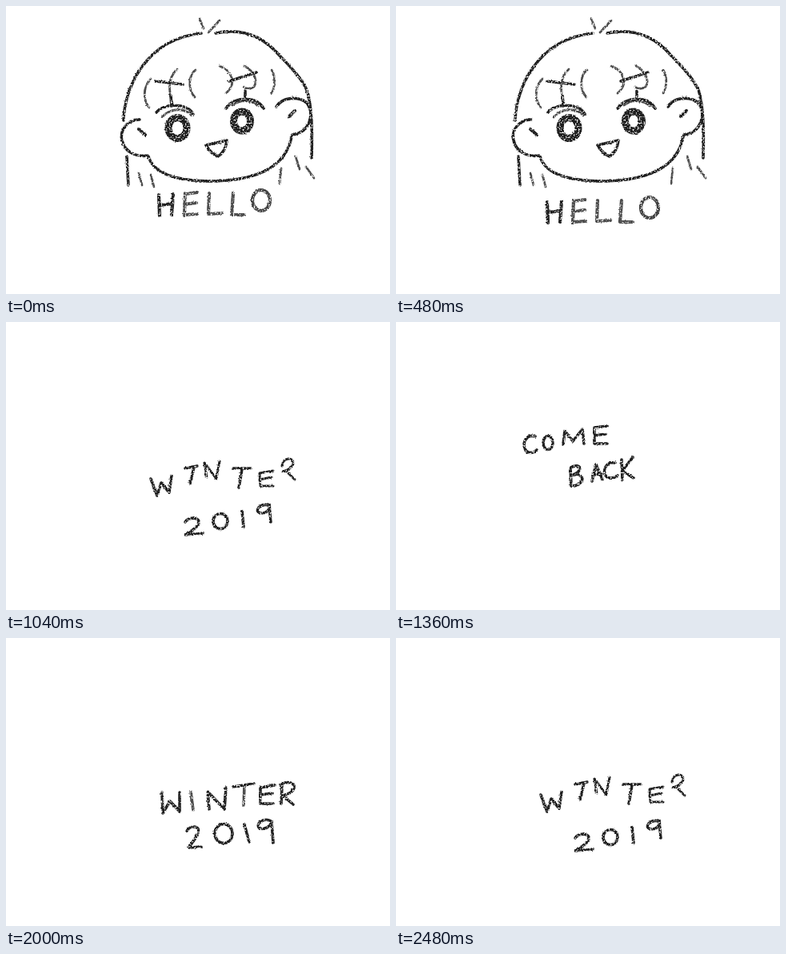
An HTML page that plays this animation: 480x360 px, repeating every 2.72 s.

```html
<!DOCTYPE html>
<html lang="en">
<head>
<meta charset="utf-8">
<title>Hello, winter 2019</title>
<style>
html, body { margin: 0; width: 100%; height: 100%; overflow: hidden; background: #fff; }
svg { display: block; width: 100vw; height: 100vh; }
#stage { fill: none; stroke: #1c1c1c; stroke-width: 3.6; stroke-linecap: round; stroke-linejoin: round; }
#stage > g { display: none; }
.thin { stroke-width: 2.8; opacity: .8; }
.bold { stroke-width: 4.2; }
</style>
</head>
<body>
<svg viewBox="0 0 480 360" role="img" aria-label="Hello. Poof. Winter 2019. Poof. Come back, winter 2019.">
<defs>
<!-- charcoal: rough edges and paper grain -->
<filter id="chalk" filterUnits="userSpaceOnUse" x="0" y="0" width="480" height="360" color-interpolation-filters="sRGB">
  <feTurbulence type="fractalNoise" baseFrequency=".5" numOctaves="2" seed="4" result="noise"/>
  <feDisplacementMap in="SourceGraphic" in2="noise" scale="2.5" xChannelSelector="R" yChannelSelector="G" result="rough"/>
  <feColorMatrix in="noise" values="0 0 0 0 0  0 0 0 0 0  0 0 0 0 0  4 0 0 0 -1.05" result="grain"/>
  <feComposite in="rough" in2="grain" operator="in"/>
</filter>

<g id="face1">
  <path d="M147 143C148 104 173 42 244 34M262 34C300 26 325 42 342 62C360 80 376 98 378 112C382 130 383 160 382 190
    M167 142C151 142 142 156 145 168C148 182 162 189 177 187M178 188C185 212 220 219 258 219C310 218 350 203 357 163
    M338 126C345 114 365 112 376 121C386 135 380 158 358 161M250 174L276 168C275 178 270 185 265 188C260 186 254 181 250 174
    M188 133C196 122 225 120 234 135M275 128C285 113 312 112 322 128M187 94L221 98M279 94L313 83
    M151 188L153 224M206 112L207 125M299 106V113"/>
  <path class="bold" d="M166 154L174 161M354 138L361 131"/>
  <path class="thin" d="M242 16L247 28M253 33L267 18M166 209L170 224M181 211L185 226M344 203L342 222M362 188L367 204M375 201L385 215
    M181 91C170 103 172 118 179 127M214 79C202 90 203 105 208 122M237 80C228 86 227 104 236 114
    M267 75C281 80 290 96 275 109M298 75C308 80 316 92 310 101C306 104 300 104 297 101M332 80C337 88 337 100 332 109
    M195 139C205 127 225 127 232 137M283 124C292 117 307 117 315 125"/>
  <ellipse cx="214.500" cy="152.500" rx="11.500" ry="13" stroke-width="9"/>
  <ellipse cx="295" cy="144" rx="10.500" ry="12" stroke-width="9"/>
</g>

<g id="face2">
  <path d="M150 140C150 106 165 85 180 70C205 42 225 30 248 29M262 34C290 27 318 30 333 45C355 65 368 90 373 114
    M174 140C160 135 145 145 145 160C146 178 158 189 175 183M175 184C188 212 215 216 258 216C310 214 352 200 356 164
    M336 130C343 114 362 109 375 115C390 130 386 158 357 163M274 167C260 169 252 174 251 180C257 187 264 191 268 191C271 187 274 180 274 175
    M191 139C195 118 225 117 235 130M277 128C280 112 310 110 320 124M213 117V124M298 107L299 113
    M150 182L153 225M379 158C385 180 387 195 387 211M351 139L362 132"/>
  <path class="thin" d="M163 155L172 158M170 209L172 224M180 210L182 222M346 203L344 222M363 189L367 212
    M173 93C172 110 173 120 180 129M186 94L214 97M211 78C207 88 211 98 200 112M241 75C231 85 231 103 238 113
    M274 76C290 84 287 98 276 108M282 92L304 84M308 78C317 85 316 98 306 105M330 82C338 92 338 102 328 113"/>
  <ellipse cx="215" cy="152.500" rx="11.500" ry="12.500" stroke-width="6.500"/>
  <ellipse cx="295.500" cy="143" rx="11" ry="12" stroke-width="8.500"/>
</g>

<g id="hello1" class="bold">
  <path d="M191 236L192 262M209 235L207 261M192 249L208 247"/>
  <path opacity=".8" d="M224 234L223 262M224 235L239 233M223 248L238 246M223 261L239 260M254 234L253 260L270 259M284 234L282 261L298 261"/>
  <ellipse opacity=".85" cx="319" cy="243" rx="11" ry="13"/>
</g>
<g id="hello2">
  <path d="M184 237V262M200 236V258M184 250L200 247M229 233L217 238V256L228 258M217 247L228 243M244 234L241 255L255 256M262 234L271 251L284 245"/>
  <ellipse cx="307.500" cy="243" rx="11" ry="12"/>
</g>

<path id="rays" stroke-width="3" opacity=".85" d="M193 83L201 91M313 72L308 83M348 84L340 95M158 139L171 133M182 199L175 214
  M275 215V228M322 212L330 221M350 201L361 205M367 167L379 161"/>
<g id="poof">
  <path d="M212 140L216 162M212 142C223 136 225 152 214 153M276 134L278 153M275 134L287 131M277 144L287 141"/>
  <ellipse cx="237.500" cy="146" rx="5.500" ry="7"/>
  <ellipse cx="260" cy="144" rx="6" ry="7.500"/>
</g>

<g id="winter1">
  <path d="M195 193L196 219L205 204L217 217V193M254 214L252 192L273 214L275 187M284 186L310 182M336 184L318 187V207L334 207
    M318 196L333 194M345 184L344 207M343 184C350 178 362 180 360 188C358 194 350 196 346 197L359 208"/>
  <path opacity=".8" d="M231 192L234 215M298 185L297 209"/>
</g>
<g id="year1">
  <path d="M226 241C230 234 243 234 240 243C238 251 230 258 229 262L244 261M298 233L304 255M332 229C322 224 311 232 317 238C323 240 331 236 332 229L334 256"/>
  <ellipse cx="272" cy="244.500" rx="11" ry="12"/>
</g>
<g id="winter2">
  <path d="M181 196L189 217L194 201L204 213L207 192M224 183L239 180M235 182L230 202M284 183L306 183M295 184L291 207"/>
  <path stroke-width="3" d="M251 194L248 176L263 196L267 174M334 186L317 189L318 205L334 205M317 197L332 194
    M345 180C346 169 360 168 359 177C357 184 350 186 346 187M350 186L361 197"/>
  <path d="M224 250C228 244 241 243 241 250C241 257 230 262 224 266L246 264M295 236L297 256M329 229C318 226 309 236 318 239C326 240 331 233 329 229L331 250"/>
  <ellipse cx="268" cy="249" rx="9" ry="9.500"/>
</g>

<g id="come">
  <path d="M174 143C163 140 158 150 161 158C164 166 172 164 176 160M209 153L211 136L221 149L233 134L235 152M264 130L248 132V152L264 152M248 142L262 140"/>
  <ellipse cx="190" cy="151" rx="6" ry="8.500"/>
</g>
<path id="back" d="M218 182L219 204M218 182C232 175 234 187 221 191C238 188 236 205 219 205M245 199L250 178L258 197M246 191L257 190
  M274 176C264 174 259 183 261 190C264 197 272 196 277 192M282 172L283 197M296 169L283 186L297 195"/>
</defs>

<g id="stage" filter="url(#chalk)">
  <g data-at="0"><use href="#face1"/><use href="#hello1"/></g>
  <g data-at="240"><use href="#face2"/><use href="#hello2"/></g>
  <g data-at="480"><use href="#face1" x="2"/><use href="#hello1" x="-2" y="9"/></g>
  <g data-at="720"><use href="#rays"/><use href="#poof"/></g>
  <g data-at="880"><use href="#rays" transform="translate(-3.500 -6.500) scale(1 1.050)"/><use href="#poof" x="-2" y="2"/></g>
  <g data-at="1040"><use href="#winter2"/></g>
  <g data-at="1200"><use href="#rays" transform="translate(-21 -13) scale(1.080)"/><use href="#poof"/></g>
  <g data-at="1280"><use href="#rays" transform="translate(-51 -31) scale(1.190)"/><use href="#poof" x="-2" y="2"/></g>
  <g data-at="1360"><use href="#come"/><use href="#back"/></g>
  <g data-at="1520"><use href="#come" x="4" y="-11"/><use href="#back" x="11" y="10"/></g>
  <g data-at="1760"><use href="#winter2"/></g>
  <g data-at="2000"><use href="#winter1"/><use href="#year1"/></g>
  <g data-at="2240"><use href="#winter1" transform="translate(-23 -10) scale(1.070 1.060)"/><use href="#year1" x="-4" y="11"/></g>
  <g data-at="2480"><use href="#winter2"/></g>
</g>
</svg>
<script>
const LOOP = 2720;
const scenes = [...document.querySelectorAll('#stage > g')];
const start = performance.now();
let shown;

function tick() {
  const t = (performance.now() - start) % LOOP;
  const scene = scenes.findLast(s => t >= s.dataset.at);
  if (scene !== shown) {
    if (shown) shown.style.display = 'none';
    scene.style.display = 'inline';
    shown = scene;
  }
  requestAnimationFrame(tick);
}
tick();
</script>
</body>
</html>
```
